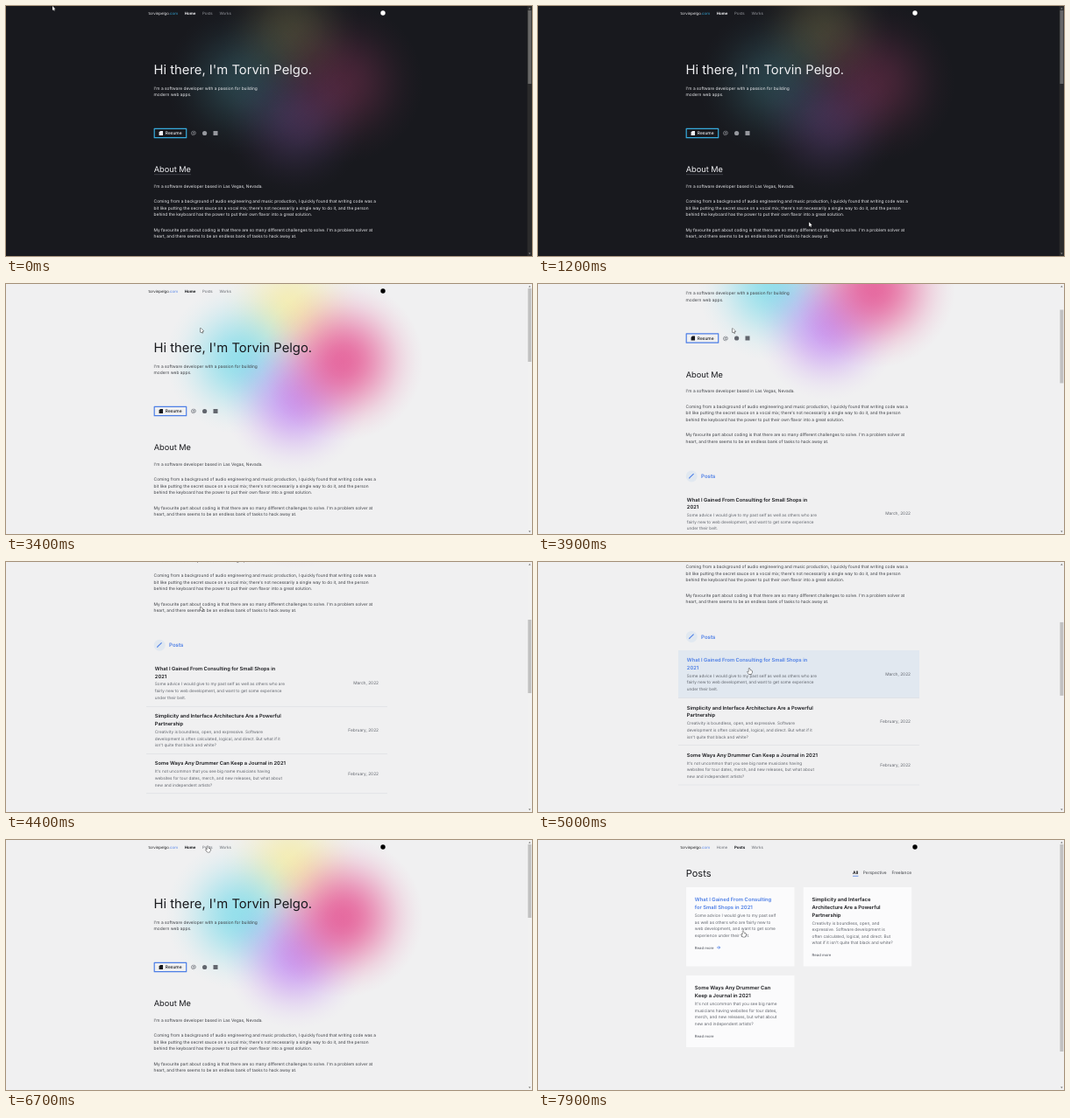
An HTML page with a canvas that plays this animation: 600x286 px, repeating every 8000 ms.

```html
<!DOCTYPE html>
<html lang="en">
<head>
<meta charset="utf-8">
<title>Portfolio</title>
<style>
html, body { margin: 0; width: 100%; height: 100%; overflow: hidden; background: #18191e; }
canvas { display: block; width: 600px; height: 286px; }
</style>
</head>
<body>
<canvas id="stage"></canvas>
<script>
const W = 600, H = 286, LOOP = 8000, THEME_AT = 2650, PAGE_AT = 6900;
const canvas = document.getElementById('stage');
const ctx = canvas.getContext('2d');
const dpr = window.devicePixelRatio || 1;
canvas.width = W * dpr;
canvas.height = H * dpr;

// Each colour is [dark, light].
const COLORS = {
  bg: [[24, 25, 30], [240, 240, 241]],
  ink: [[240, 240, 243], [24, 25, 29]],
  body: [[232, 233, 236], [62, 64, 70]],
  muted: [[150, 152, 158], [98, 102, 110]],
  blue: [[56, 172, 222], [76, 126, 230]],
  rowHover: [[32, 42, 54], [225, 232, 240]],
  rule: [[52, 54, 60], [219, 221, 225]],
  card: [[32, 33, 39], [251, 251, 252]],
  track: [[43, 43, 44], [241, 241, 241]],
  thumb: [[104, 104, 104], [193, 193, 193]],
  arrows: [[150, 150, 150], [90, 90, 90]]
};

const POSTS = [
  { date: 'March, 2022', top: 319, height: 54.5,
    title: ['What I Gained From Consulting for Small Shops in', '2021'],
    text: ['Some advice I would give to my past self as well as others who are',
      'fairly new to web development, and want to get some experience', 'under their belt.'],
    card: { x: 169, y: 54, h: 90.5,
      title: ['What I Gained From Consulting', 'for Small Shops in 2021'],
      text: ['Some advice I would give to my past self', 'as well as others who are fairly new to',
        'web development, and want to get some', 'experience under their belt.'] } },
  { date: 'February, 2022', top: 373.5, height: 54,
    title: ['Simplicity and Interface Architecture Are a Powerful', 'Partnership'],
    text: ['Creativity is boundless, open, and expressive. Software',
      'development is often calculated, logical, and direct. But what if it',
      "isn't quite that black and white?"],
    card: { x: 302.7, y: 54, h: 90.5,
      title: ['Simplicity and Interface', 'Architecture Are a Powerful', 'Partnership'],
      text: ['Creativity is boundless, open, and', 'expressive. Software development is',
        'often calculated, logical, and direct. But', "what if it isn't quite that black and white?"] } },
  { date: 'February, 2022', top: 427.5, height: 45.5,
    title: ['Some Ways Any Drummer Can Keep a Journal in 2021'],
    text: ["It's not uncommon that you see big name musicians having",
      'websites for tour dates, merch, and new releases, but what about',
      'new and independent artists?'],
    card: { x: 169, y: 155, h: 82,
      title: ['Some Ways Any Drummer Can', 'Keep a Journal in 2021'],
      text: ["It's not uncommon that you see big name", 'musicians having websites for tour dates,',
        'merch, and new releases, but what about', 'new and independent artists?'] } }
];

// [time, value...]
const SCROLL = [[3500, 0], [3900, 83.5], [4500, 218], [5300, 218], [5750, 0]];
const CURSOR = [
  [700, 53, 0], [1150, 290, 250], [1400, 468, 225], [1600, 450, 181], [2000, 430, 9.5],
  [2700, 430, 9.5], [3300, 222, 50.5], [4450, 222, 51], [4950, 241, 121.5],
  [5300, 241, 121.5], [5650, 271.5, 135.5], [6200, 271.5, 135.5], [6700, 230, 7],
  [7100, 230, 8], [7350, 370, 95], [7600, 245, 195], [7850, 234, 104]
];

const clamp = v => Math.min(1, Math.max(0, v));
const lerp = (a, b, k) => a + (b - a) * k;
const rgb = c => `rgb(${c.map(Math.round).join()})`;

function track(keys, t) {
  const next = keys.findIndex(k => k[0] > t);
  if (next === 0) return keys[0].slice(1);
  if (next < 0) return keys[keys.length - 1].slice(1);
  const a = keys[next - 1], b = keys[next];
  const p = (t - a[0]) / (b[0] - a[0]);
  const k = p * p * (3 - 2 * p);
  return a.slice(1).map((v, i) => lerp(v, b[i + 1], k));
}

function palette(light) {
  const out = {};
  for (const name in COLORS) {
    const [d, l] = COLORS[name];
    out[name] = rgb(d.map((v, i) => lerp(v, l[i], light)));
  }
  return out;
}

// Small type is laid out large and scaled down to keep fractional advances.
function text(str, x, y, size, color, weight = 400, align = 'left') {
  ctx.save();
  ctx.translate(x, y);
  ctx.scale(1 / 8, 1 / 8);
  ctx.font = `${weight} ${size * 8}px Inter, sans-serif`;
  ctx.textAlign = align;
  ctx.fillStyle = color;
  ctx.fillText(str, 0, 0);
  const width = ctx.measureText(str).width / 8;
  ctx.restore();
  return width;
}

function lines(list, x, y, step, size, color, weight) {
  list.forEach((s, i) => text(s, x, y + i * step, size, color, weight));
}

function rect(x, y, w, h, color) {
  ctx.fillStyle = color;
  ctx.fillRect(x, y, w, h);
}

function disc(x, y, r, color) {
  ctx.fillStyle = color;
  ctx.beginPath();
  ctx.arc(x, y, r, 0, 7);
  ctx.fill();
}

function stroke(points, color, width) {
  ctx.strokeStyle = color;
  ctx.lineWidth = width;
  ctx.beginPath();
  points.forEach(([x, y]) => ctx.lineTo(x, y));
  ctx.stroke();
}

function glow(x, y, r, color, alpha) {
  const g = ctx.createRadialGradient(x, y, 0, x, y, r);
  for (let i = 0; i <= 10; i++) {
    const u = i / 10;
    const a = alpha * Math.exp(-2.6 * u * u) * (1 - u ** 4);
    g.addColorStop(u, `rgba(${color},${a.toFixed(4)})`);
  }
  ctx.fillStyle = g;
  ctx.fillRect(x - r, y - r, 2 * r, 2 * r);
}

function glows(light) {
  const a = lerp(0.24, 0.8, light);
  glow(325, 28, 80, '246,234,140', a * 0.75);
  glow(268, 86, 86, '105,215,232', a * 0.85);
  glow(330, 134, 82, '186,120,242', a * 0.85);
  glow(384, 88, 92, '228,75,140', a);
}

function nav(c, active) {
  const w = text('torvinpelgo', 162.5, 9.7, 4.35, c.ink);
  text('.com', 162.5 + w, 9.7, 4.35, c.blue);
  [['Home', 203.7], ['Posts', 224], ['Works', 243.4]].forEach(([name, x]) => {
    const on = name === active;
    text(name, x, 9.7, 4.45, on ? c.ink : c.muted, on ? 700 : 400);
  });
}

function icons(c) {
  ctx.strokeStyle = c.blue;
  ctx.lineWidth = 1.2;
  ctx.strokeRect(169.2, 140.3, 36.5, 10.4);
  ctx.fillStyle = c.ink;
  ctx.beginPath();
  [[176, 143], [179, 143], [179, 148], [174.6, 148], [174.6, 144.4]].forEach(p => ctx.lineTo(...p));
  ctx.fill();
  text('Resume', 181.8, 147.2, 4.9, c.ink, 500);
  text('@', 214, 147.4, 6, c.muted, 500, 'center');
  disc(226.6, 145.5, 2.6, c.muted);
  rect(236.5, 143, 5, 5, c.muted);
}

function row(post, c, hot) {
  const y = post.top, n = post.title.length;
  if (hot) rect(160, y, 275, post.height, c.rowHover);
  lines(post.title, 169.8, y + 13.2, 8.6, 5.75, hot ? c.blue : c.ink, 600);
  lines(post.text, 169.8, y + 22.1 + (n - 1) * 8.6, 7.65, 4.7, c.muted);
  text(post.date, 425, y + post.height / 2 + 1.6, 4.8, c.muted, 400, 'right');
  rect(160, y + post.height - 0.3, 275, 0.6, c.rule);
}

function home(c, light, px, py) {
  glows(light);
  nav(c, 'Home');
  disc(430, 8, 2.7, light > 0.5 ? '#000' : '#fff');
  text("Hi there, I'm Torvin Pelgo.", 168.5, 78.4, 14.8, c.ink);
  lines(["I'm a software developer with a passion for building", 'modern web apps.'],
    168.6, 95.7, 7.5, 4.85, c.body);
  icons(c);
  text('About Me', 168.7, 190.3, 9.2, c.ink);
  if (light < 0.5) rect(169, 192.5, 42, 0.6, '#55575e');
  text("I'm a software developer based in Las Vegas, Nevada.", 168.6, 207.8, 4.85, c.body);
  lines(['Coming from a background of audio engineering and music production, I quickly found that writing code was a',
    "bit like putting the secret sauce on a vocal mix; there's not necessarily a single way to do it, and the person",
    'behind the keyboard has the power to put their own flavor into a great solution.'],
    168.6, 225.3, 7.5, 4.85, c.body);
  lines(["My favourite part about coding is that there are so many different challenges to solve. I'm a problem solver at",
    'heart, and there seems to be an endless bank of tasks to hack away at.'],
    168.6, 257.8, 7.5, 4.85, c.body);
  disc(175.2, 303.4, 6.5, c.rowHover);
  stroke([[172.5, 306], [173.1, 304.8], [177.6, 300.6]], c.blue, 1.1);
  text('Posts', 186, 305.7, 6.1, c.blue, 600);
  POSTS.forEach(p => row(p, c, px > 160 && px < 435 && py > p.top && py < p.top + p.height));
}

function card(post, c, px, py) {
  const { x, y, h, title, text: copy } = post.card;
  const hot = px > x && px < x + 123.5 && py > y && py < y + h;
  rect(x, y, 123.5, h, c.card);
  const left = x + 9.8, below = y + 34 + (title.length - 2) * 8.6;
  lines(title, left, y + 16.4, 8.6, 5.85, hot ? c.blue : c.ink, 600);
  lines(copy, left, below, 7.5, 4.8, c.muted);
  text('Read more', left, below + 36.6, 4.25, c.muted, 500);
  if (hot) {
    const ax = x + 35, ay = below + 35;
    stroke([[ax, ay], [ax + 3.6, ay]], c.blue, 0.8);
    stroke([[ax + 2, ay - 1.7], [ax + 3.7, ay], [ax + 2, ay + 1.7]], c.blue, 0.8);
  }
}

function postsPage(c, t, px, py) {
  nav(c, 'Posts');
  disc(430, 8, 2.7, '#000');
  ctx.globalAlpha = clamp((t - PAGE_AT + 50) / 250);
  text('Posts', 168.8, 41.8, 11, c.ink);
  text('All', 359, 39.2, 4.9, c.ink, 700);
  rect(359, 40.8, 6.4, 0.8, c.blue);
  text('Perspective', 370.8, 39.2, 4.8, c.body);
  text('Freelance', 426, 39.2, 4.85, c.body, 400, 'right');
  POSTS.forEach(p => card(p, c, px, py));
  ctx.globalAlpha = 1;
}

function scrollbar(c, top, length) {
  rect(594.7, 0, 5.3, H, c.track);
  rect(595.4, top, 3.9, length, c.thumb);
  [[2.8, -1], [283.2, 1]].forEach(([y, d]) => {
    ctx.fillStyle = c.arrows;
    ctx.beginPath();
    [[596.1, y - d * 0.6], [598.5, y - d * 0.6], [597.3, y + d * 0.8]].forEach(p => ctx.lineTo(...p));
    ctx.fill();
  });
}

const ARROW = [[0, 0], [0, 4.9], [1.1, 3.9], [1.9, 5.6], [2.7, 5.2], [1.9, 3.6], [3.4, 3.5]];
const HAND = [[-0.6, 0.2], [0, -0.2], [0.6, 0.2], [0.7, 2.3], [3, 2.9], [3.3, 3.6], [2.9, 5.3],
  [2.4, 6.8], [-0.5, 6.8], [-2.1, 4.3], [-1.8, 3.7], [-0.6, 4.5]];

function pointer(x, y, hand) {
  ctx.beginPath();
  (hand ? HAND : ARROW).forEach(([dx, dy]) => ctx.lineTo(x + dx, y + dy));
  ctx.closePath();
  ctx.lineJoin = 'round';
  ctx.lineWidth = 0.9;
  ctx.strokeStyle = '#222';
  ctx.stroke();
  ctx.fillStyle = '#fff';
  ctx.fill();
}

function overLink(x, y, pageY, onPosts) {
  if (pageY < 13 && (Math.abs(x - 430) < 5 || (x > 203 && x < 257))) return true;
  if (!onPosts) return pageY > 319 && pageY < 473 && x > 160 && x < 435;
  return POSTS.some(({ card: k }) => x > k.x && x < k.x + 123.5 && y > k.y && y < k.y + k.h);
}

function draw(t) {
  const light = clamp((t - THEME_AT) / 200);
  const c = palette(light);
  const [scroll] = track(SCROLL, t);
  const [x, y] = track(CURSOR, t);
  const onPosts = t >= PAGE_AT;
  ctx.setTransform(dpr, 0, 0, dpr, 0, 0);
  rect(0, 0, W, H, c.bg);
  if (onPosts) {
    postsPage(c, t, x, y);
  } else {
    ctx.translate(0, -scroll);
    home(c, light, x, y + scroll);
    ctx.translate(0, scroll);
  }
  scrollbar(c, 5 + scroll * 0.293, onPosts ? 237 : 84);
  pointer(x, y, overLink(x, y, y + scroll, onPosts));
}

function frame() {
  draw(performance.now() % LOOP);
  requestAnimationFrame(frame);
}
ctx.textRendering = 'geometricPrecision';
frame();
</script>
</body>
</html>
```
